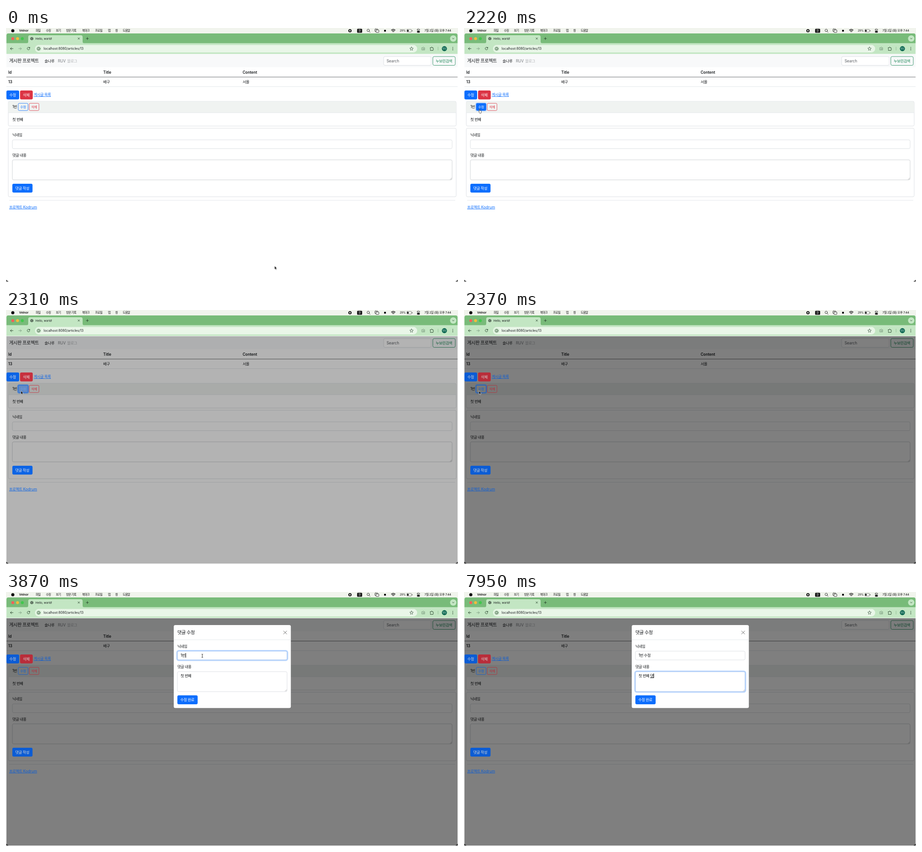
These frames come from a looping animation (997 px wide and 561 px high, 8000 ms). An HTML page:

```html
<!DOCTYPE html>
<html lang="ko">
<head>
<meta charset="utf-8">
<title>댓글 수정</title>
<style>
html, body { margin: 0; width: 100%; height: 100%; overflow: hidden; background: #fff; }
svg, .layer { position: absolute; left: 0; top: 0; width: 997px; height: 561px; }
text, p { font: 8.3px Inter, "Noto Sans CJK KR", "Noto Sans CJK", sans-serif; fill: #16191c; }
.k, p { letter-spacing: -.05em; }
.b { font-weight: 600; }
.menu text { font-size: 6.6px; fill: #111; }
.big { font-size: 10.3px; }
.s { font-size: 7.2px; }
.link { fill: #0d6efd; text-decoration: underline; }
.btn { fill: #fff; font-weight: 500; }
.blue { fill: #0d6efd; }
.red { fill: #dc3545; }
.box { fill: #fff; stroke: #d5d9de; stroke-width: .8; }
.line { stroke: #dee2e6; stroke-width: .8; }
.icon { fill: none; stroke: #25402a; stroke-width: .9; stroke-linecap: round; stroke-linejoin: round; }
.menu .icon { stroke: #111; stroke-width: .8; }

.shade, .vivid, .modal, .pos, .pos g, .edit *, .focus, .caret, i::before, i::after { animation: 8s linear infinite; }
.step, .pos g, .caret, i::before, i::after { animation-timing-function: step-end !important; }

.shade { left: 1px; top: 57.5px; width: 995px; height: 502px; background: #000; animation-name: shade; }
@keyframes shade { 0%, 27.85% { opacity: 0 } 29.6%, 100% { opacity: .5 } }
.vivid { animation-name: vivid; }
@keyframes vivid { 0%, 27.85% { filter: brightness(1) } 29.6%, 100% { filter: brightness(.84) } }

.edit .face { animation-name: face; fill: #0d6efd; }
@keyframes face { 0%, 25.8% { fill-opacity: 0 } 27.6%, 28% { fill-opacity: 1 } 29.6%, 100% { fill-opacity: 0 } }
.edit text { animation-name: label; }
@keyframes label { 0%, 25.8% { fill: #0d6efd } 27.6%, 28% { fill: #fff } 29.6%, 100% { fill: #0d6efd } }
.edit .ring { animation-name: ring; fill: none; stroke: #0d6efd; stroke-width: 2; }
@keyframes ring { 0%, 27.2% { opacity: 0 } 28.8%, 33.75% { opacity: .5 } 35.6%, 100% { opacity: 0 } }

.clip { clip-path: inset(57.5px 1px 1.5px); }
.modal { animation-name: fade, slide; animation-timing-function: linear, ease-out; }
@keyframes fade { 0%, 30% { opacity: 0 } 31.9%, 100% { opacity: 1 } }
@keyframes slide { 0%, 30% { transform: translateY(-26px) } 33.75%, 100% { transform: none } }

.focus { fill: none; stroke: #86b7fe; stroke-width: .8; }
.focus.halo { stroke: #c2dbfe; stroke-width: 3; }
.f1 { animation-name: focusName; }
@keyframes focusName { 0%, 46.5% { opacity: 0 } 48.3%, 61.9% { opacity: 1 } 63.75%, 100% { opacity: 0 } }
.f2 { animation-name: focusBody; }
@keyframes focusBody { 0%, 61.9% { opacity: 0 } 63.75%, 100% { opacity: 1 } }

p { position: absolute; left: 385px; margin: 0; line-height: 12.4px; white-space: pre; color: #16191c; }
p i { font-style: normal; }
i::after { text-decoration: underline; text-decoration-thickness: .8px; text-underline-offset: 1.2px; }
.name { top: 134.3px; }
.body { top: 179.1px; }
.caret { display: inline-block; width: .9px; height: 9.5px; margin-left: .4px; vertical-align: -1.7px; background: #000; }

.name i::before { content: ""; animation-name: nameDone; }
@keyframes nameDone { 0% { content: "" } 50.63% { content: " " } 57.4% { content: " 수" } 61.9%, 100% { content: " 수정" } }
.name i::after { content: ""; animation-name: nameKeys; }
@keyframes nameKeys {
  0% { content: "" } 52.5% { content: "ㅅ" } 54% { content: "수" } 55.9% { content: "숮" }
  57.4% { content: "저" } 58.9% { content: "정" } 61.9%, 100% { content: "" }
}
.name .caret { animation-name: nameCaret; }
@keyframes nameCaret { 0% { opacity: 0 } 46.5% { opacity: 1 } 61.9%, 100% { opacity: 0 } }
.body i::before { content: ""; animation-name: bodyDone; }
@keyframes bodyDone { 0% { content: "" } 82.5%, 100% { content: " " } }
.body i::after { content: ""; animation-name: bodyKeys; }
@keyframes bodyKeys { 0% { content: "" } 93.75% { content: "ㄷ" } 95.63% { content: "대" } 97.5%, 100% { content: "댓" } }
.body .caret { animation-name: bodyCaret; }
@keyframes bodyCaret {
  0% { opacity: 0 } 61.9% { opacity: 1 } 68.1% { opacity: 0 } 73.1% { opacity: 1 }
  76.2% { opacity: 0 } 82.5% { opacity: 1 } 88.7% { opacity: 0 } 93.75%, 100% { opacity: 1 }
}

.pos { animation-name: move; }
@keyframes move {
  0%, 6% { transform: translate(592.5px, 525.5px); animation-timing-function: ease-in-out }
  15.75% { transform: translate(110px, 215px); animation-timing-function: ease-in-out }
  23.6% { transform: translate(40px, 191px) }
  25.5% { transform: translate(37px, 184px) }
  27%, 35.6% { transform: translate(33px, 178.5px); animation-timing-function: ease-in-out }
  45.3%, 100% { transform: translate(433px, 141px) }
}
.pos g { opacity: 0; }
.arrow { animation-name: arrow !important; }
@keyframes arrow { 0% { opacity: 1 } 25.8% { opacity: 0 } 28.2% { opacity: 1 } 44.2%, 100% { opacity: 0 } }
.hand { animation-name: hand !important; }
@keyframes hand { 0% { opacity: 0 } 25.8% { opacity: 1 } 28.2%, 100% { opacity: 0 } }
.beam { animation-name: beam !important; }
@keyframes beam { 0% { opacity: 0 } 44.2% { opacity: 1 } 50.63%, 100% { opacity: 0 } }
</style>
</head>
<body>
<svg viewBox="0 0 997 561">
  <!-- system menu -->
  <rect width="997" height="13" fill="#f1f4ed"/>
  <g class="menu">
    <circle cx="15" cy="6" r="3.5" fill="#111"/>
    <text class="b" x="29" y="8.3">Velnor</text>
    <g class="k">
      <text x="65.5" y="8.3">파일</text><text x="88" y="8.3">수정</text><text x="110" y="8.3">보기</text>
      <text x="132.5" y="8.3">방문 기록</text><text x="168" y="8.3">북마크</text><text x="196.5" y="8.3">프로필</text>
      <text x="225" y="8.3">탭</text><text x="241" y="8.3">창</text><text x="257.5" y="8.3">도움말</text>
    </g>
    <circle cx="758.7" cy="6" r="2.6" fill="none" stroke="#111" stroke-width="2"/>
    <rect x="774.5" y="1.8" width="11" height="8.6" rx="1.5" fill="#111"/>
    <text class="k" x="777.2" y="8.4" style="fill:#fff;font-size:6px">한</text>
    <g class="icon">
      <circle cx="799" cy="5.3" r="2.7"/><path d="M801 7.4l2.2 2.3"/>
      <rect x="813.7" y="2.3" width="6.5" height="5.5" rx="1"/><rect x="816" y="4.2" width="6.5" height="5.5" rx="1" fill="#f1f4ed"/>
      <path d="M850 4.5q4.2-3.4 8.4 0M851.5 6.3q2.7-2.1 5.4 0M853 8q1.2-1 2.4 0" stroke-width="1.2"/>
      <rect x="884" y="3.2" width="10.5" height="5.8" rx="1.4" stroke-opacity=".6"/><path d="M896 5.2v1.8"/>
      <rect x="906.8" y="2.6" width="5.8" height="2.8" rx="1.4"/><rect x="906.8" y="7" width="5.8" height="2.8" rx="1.4" fill="#111"/>
    </g>
    <rect x="834" y="4" width="4" height="4" fill="#111"/>
    <rect x="885" y="4.2" width="3" height="3.8" rx=".6" fill="#111"/>
    <text x="868.5" y="8.2" style="font-size:5.9px">29%</text>
    <text class="k" x="923" y="8.3">7월 2일 (화) 오후 7:44</text>
  </g>

  <!-- browser frame -->
  <path d="M1 34V16q0-4 4-4H992q4 0 4 4V34z" fill="#78bb79"/>
  <rect x="1" y="33.5" width="995" height="24" fill="#c3e6c3"/>
  <path d="M45 34q4 0 4-4V20q0-4 4-4H165q4 0 4 4V30q0 4 4 4z" fill="#c3e6c3"/>
  <circle cx="15" cy="23.5" r="3.2" fill="#f4605a"/><circle cx="25.5" cy="23.5" r="3.2" fill="#f2bd3b"/><circle cx="36" cy="23.5" r="3.2" fill="#41c74d"/>
  <circle cx="57" cy="23.3" r="3.4" fill="#4a5a4d"/><path d="M54.6 22q2 0 2 1.6t1.6 2M57.6 20.7q.2 1.6 2.2 1.6" fill="none" stroke="#c3e6c3" stroke-width=".9"/>
  <text x="65" y="25.5" style="font-size:6.2px">Hello, world!</text>
  <circle cx="986.5" cy="23.3" r="7" fill="#c3e6c3"/>
  <rect x="64" y="37.5" width="843" height="16.5" rx="8.2" fill="#e9f6e8"/>
  <circle cx="72" cy="45.7" r="6" fill="#d3edd3"/>
  <g class="icon">
    <path d="M158.8 21.6l3.4 3.4m0-3.4l-3.4 3.4M177 23.3h5m-2.5-2.5v5M984.8 22.5l1.7 1.7l1.7-1.7"/>
    <path d="M15.7 45.6h-6m2.7-2.7l-2.7 2.7l2.7 2.7"/>
    <path d="M28 45.6h6m-2.7-2.7l2.7 2.7l-2.7 2.7" stroke="#7d9d80"/>
    <path d="M52 43.6a2.9 2.9 0 1 0 .4 2.7M52.5 42.4v1.9h-1.9"/>
    <circle cx="72" cy="45.7" r="3.2"/><path d="M72 45.5v1.7M72 44v.1"/>
    <path d="M894.5 41.8l1.1 2.5l2.8.3l-2.1 1.9l.6 2.7l-2.4-1.4l-2.4 1.4l.6-2.7l-2.1-1.9l2.8-.3z" stroke-width=".7"/>
    <path d="M917.5 43.5h1.6l.7-1.1h1.8l.7 1.1h1.2v5h-6z" stroke="#75957a"/><circle cx="920.6" cy="45.9" r="1.1" stroke="#75957a"/>
    <path d="M936 43.5h2v-.8q1-1.5 2 0v.8h2v2h.5q1.5 1 0 2h-.5v2h-6v-2q1.6-1 0-2z"/>
    <path d="M953 42v7" stroke="#8fbd91"/>
  </g>
  <text class="s" x="83" y="48.3">localhost:8080/articles/13</text>
  <circle cx="967" cy="45.6" r="5.6" fill="#0b6650"/>
  <text class="k" x="962.9" y="47.3" style="font-size:4.7px;fill:#e8f5ee">민우</text>
  <g fill="#25402a"><circle cx="985.5" cy="42.8" r=".8"/><circle cx="985.5" cy="45.6" r=".8"/><circle cx="985.5" cy="48.4" r=".8"/></g>

  <!-- page -->
  <rect x="1" y="57.5" width="995" height="29" fill="#f8f9fa"/>
  <text class="k big" x="7" y="76">게시판 프로젝트</text>
  <text class="k" x="85" y="75.5">솔나루</text>
  <text x="114.5" y="75.5" style="fill:#777b7f">RUV</text>
  <text class="k" x="135" y="75.5" style="fill:#adb0b3">블로그</text>
  <rect class="box" x="833" y="63" width="105" height="19.5" rx="3"/>
  <text x="839.5" y="75.7" style="fill:#55595e">Search</text>
  <rect x="941.5" y="63" width="49.5" height="19.5" rx="3" fill="none" stroke="#198754" stroke-width=".8"/>
  <text class="k" x="948" y="75.7" style="fill:#198754">누보린검색</text>

  <g class="b"><text class="b" x="5" y="101">Id</text><text class="b" x="214.5" y="101">Title</text><text class="b" x="522" y="101">Content</text><text class="b" x="5" y="122">13</text></g>
  <path d="M1 108.3H996" stroke="#5a5d60" stroke-width=".9"/>
  <path class="line" d="M1 129.5H996M7 380.5H991"/>
  <text class="k" x="214.5" y="122">배구</text><text class="k" x="522" y="122">서율</text>

  <rect class="box" x="5" y="162" width="988" height="54.5" rx="3"/>
  <path d="M5.4 187V165q0-2.6 2.6-2.6H990q2.6 0 2.6 2.6V187z" fill="#f0f3f1"/>
  <path class="line" d="M5 187H993"/>
  <text class="k" x="14" y="177.3">1번</text>
  <text class="k" x="14" y="205">첫 번째</text>

  <rect class="box" x="5" y="221.3" width="988" height="151.5" rx="3"/>
  <text class="k" x="14" y="239.3">닉네임</text>
  <rect class="box" x="14" y="247" width="970" height="19.5" rx="3"/>
  <text class="k" x="14" y="283.7">댓글 내용</text>
  <rect class="box" x="14" y="291.2" width="970" height="44.3" rx="3" style="stroke:#c4c8cc"/>
  <path class="icon" d="M979.5 334.5l3.5-3.5m-1.5 3.5l1.5-1.5" style="stroke:#888;stroke-width:.5"/>
  <path d="M1 556.5V559.5H5Q1.8 559.3 1 556.5M996 556.5V559.5H992Q995.2 559.3 996 556.5" fill="#000" stroke="#000" stroke-width=".6"/>
</svg>

<div class="layer shade"></div>

<svg class="vivid" viewBox="0 0 997 561">
  <rect class="blue" x="1" y="138" width="28" height="19.7" rx="3"/><text class="k btn" x="7.6" y="150.8">수정</text>
  <rect class="red" x="31" y="138" width="28" height="19.7" rx="3"/><text class="k btn" x="37.6" y="150.8">삭제</text>
  <text class="k link" x="61" y="150">게시글 목록</text>
  <g class="edit">
    <rect class="ring" x="26" y="165.2" width="23.5" height="18.3" rx="3"/>
    <rect class="face" x="27" y="166.3" width="21.5" height="16" rx="2.2" stroke="#0d6efd" stroke-width=".8"/>
    <text class="k s" x="31.6" y="177">수정</text>
  </g>
  <rect x="51.2" y="166.3" width="21.5" height="16" rx="2.2" fill="none" stroke="#dc3545" stroke-width=".8"/>
  <text class="k s red" x="55.8" y="177" style="fill:#dc3545">삭제</text>
  <rect class="blue" x="14" y="344" width="44.5" height="19.5" rx="3"/><text class="k btn" x="20.6" y="356.8">댓글 작성</text>
  <text class="k link" x="7" y="398.6">프로젝트 <tspan letter-spacing="0">Kodrum</tspan></text>
</svg>

<div class="layer clip">
  <div class="layer modal">
    <svg viewBox="0 0 997 561">
      <rect x="370" y="73" width="258.3" height="183.3" rx="3.5" fill="#fff"/>
      <path class="line" d="M370 105.6H628.3"/>
      <text class="k big" x="378" y="92.8">댓글 수정</text>
      <path class="icon" d="M612.3 86l7 7m0-7l-7 7" style="stroke:#555"/>
      <text class="k" x="378" y="123.3">닉네임</text>
      <rect class="focus halo f1" x="377" y="129.6" width="244" height="21.4" rx="4"/>
      <rect class="box" x="378" y="130.6" width="242" height="19.4" rx="3"/>
      <rect class="focus f1" x="378" y="130.6" width="242" height="19.4" rx="3"/>
      <text class="k" x="378" y="167.8">댓글 내용</text>
      <rect class="focus halo f2" x="377" y="174.9" width="244" height="46.2" rx="4"/>
      <rect class="box" x="378" y="175.9" width="242" height="44.2" rx="3"/>
      <rect class="focus f2" x="378" y="175.9" width="242" height="44.2" rx="3"/>
      <path class="icon" d="M615.5 219l3.5-3.5m-1.5 3.5l1.5-1.5" style="stroke:#888;stroke-width:.5"/>
      <rect class="blue" x="378" y="228.3" width="44.7" height="19.6" rx="3"/>
      <text class="k btn" x="384.6" y="241.2">수정 완료</text>
    </svg>
    <p class="name">1번<i></i><b class="caret"></b></p>
    <p class="body">첫 번째<i></i><b class="caret"></b></p>
  </div>
</div>

<svg viewBox="0 0 997 561">
  <g class="pos">
    <g class="arrow"><path d="M0 0V7.6L1.7 6.1L2.9 8.9L4.2 8.3L3 5.7H5.2z" fill="#000" stroke="#fff" stroke-width=".6"/></g>
    <g class="hand"><path d="M.6 1Q1.4-.2 2 1V4Q2.8 3.4 3.2 4.2Q4 3.7 4.3 4.5Q5.3 4.2 5.3 5.4V7.2L4.6 9.6H1.6L-.4 6.4Q-.4 5.3.6 6z" fill="#fff" stroke="#111" stroke-width=".7"/></g>
    <g class="beam"><path d="M-1.6-3.8Q0-3.8 0-2.8Q0-3.8 1.6-3.8M0-3V3M-1.6 3.8Q0 3.8 0 2.8Q0 3.8 1.6 3.8" fill="none" stroke="#222" stroke-width=".9"/></g>
  </g>
</svg>
</body>
</html>
```
